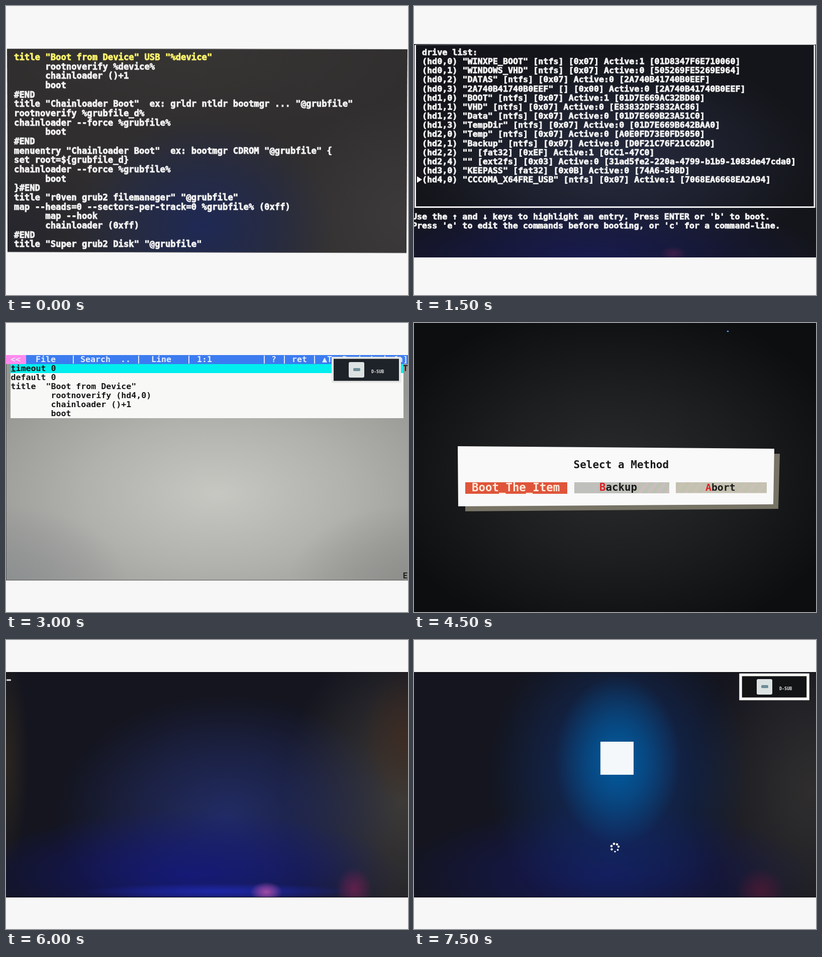
These frames come from a looping animation (800x577 px, 8 s). An HTML page:

```html
<!DOCTYPE html>
<html lang="en">
<head>
<meta charset="utf-8">
<title>Boot sequence</title>
<style>
  html, body { margin: 0; width: 100%; height: 100%; overflow: hidden; background: #f7f7f7; }
  svg { display: block; width: 100%; height: 100%; }
  text { font-family: "DejaVu Sans Mono", monospace; font-weight: bold; white-space: pre; }
</style>
</head>
<body>
<svg id="stage" viewBox="0 0 800 577"></svg>
<script>
const LOOP = 8000, HOLD = 1500;
let nextId = 0;

const rect = (x, y, w, h, fill, extra = '') =>
  `<rect x="${x}" y="${y}" width="${w}" height="${h}" fill="${fill}" ${extra}/>`;

const poly = (points, fill) => `<polygon points="${points}" fill="${fill}"/>`;

const ellipse = (x, y, rx, ry, fill) =>
  `<ellipse cx="${x}" cy="${y}" rx="${rx}" ry="${ry}" fill="${fill}"/>`;

const text = (x, y, size, fill, str, extra = '') =>
  `<text x="${x}" y="${y}" font-size="${size}" fill="${fill}" ${extra}>${str.replace(/</g, '&lt;')}</text>`;

// Over-exposed white or yellow screen text
const brightText = (x, y, size, str, color = '#f2f2f2') =>
  text(x, y, size, color, str, `stroke="${color}" stroke-width=".9"`);

// Label whose first letter is a red shortcut key
const hotkeyText = (x, y, size, str) =>
  `<text x="${x}" y="${y}" font-size="${size}" fill="#1b1b1b"><tspan fill="#df2020">${str[0]}</tspan>${str.slice(1)}</text>`;

// Ellipse that fades from its colour to nothing at the rim
function glow(x, y, rx, ry, color, alpha = 1) {
  const id = 'glow' + nextId++;
  return `<radialGradient id="${id}">
    <stop offset="0" stop-color="${color}" stop-opacity="${alpha}"/>
    <stop offset=".5" stop-color="${color}" stop-opacity="${alpha * 0.55}"/>
    <stop offset="1" stop-color="${color}" stop-opacity="0"/></radialGradient>` +
    ellipse(x, y, rx, ry, `url(#${id})`);
}

// Photographed screen: flat base colour with glows, clipped to its outline
function screen(points, base, ...glows) {
  const id = 'screen' + nextId++;
  return `<clipPath id="${id}"><polygon points="${points}"/></clipPath>
    <g clip-path="url(#${id})">${poly(points, base)}${glows.join('')}</g>`;
}

const WIDE = '0,64 800,64 800,514 0,514';

function menuFile() {
  const lines = `title "Boot from Device" USB "%device"
      rootnoverify %device%
      chainloader ()+1
      boot
#END
title "Chainloader Boot"  ex: grldr ntldr bootmgr ... "@grubfile"
rootnoverify %grubfile_d%
chainloader --force %grubfile%
      boot
#END
menuentry "Chainloader Boot"  ex: bootmgr CDROM "@grubfile" {
set root=\${grubfile_d}
chainloader --force %grubfile%
      boot
}#END
title "r0ven grub2 filemanager" "@grubfile"
map --heads=0 --sectors-per-track=0 %grubfile% (0xff)
      map --hook
      chainloader (0xff)
#END
title "Super grub2 Disk" "@grubfile"`.split('\n');
  return screen('2,85 799,86 797,493 3,491', '#302e2e',
      glow(400, 90, 420, 170, '#3a3836', 0.7),
      glow(800, 420, 260, 240, '#423f40', 0.7),
      glow(0, 480, 260, 200, '#20212c', 0.7),
      glow(390, 440, 260, 220, '#1c2858', 0.9)) +
    '<path d="M2 85.5L799 86.5M3 491L797 493" stroke="#777" fill="none"/>' +
    lines.map((line, i) => brightText(16, 108 + i * 18.66, 17.24, line, i ? undefined : '#fbf26c')).join('');
}

function driveList() {
  const lines = `drive list:
(hd0,0) "WINXPE_BOOT" [ntfs] [0x07] Active:1 [01D8347F6E710060]
(hd0,1) "WINDOWS_VHD" [ntfs] [0x07] Active:0 [505269FE5269E964]
(hd0,2) "DATAS" [ntfs] [0x07] Active:0 [2A740B41740B0EEF]
(hd0,3) "2A740B41740B0EEF" [] [0x00] Active:0 [2A740B41740B0EEF]
(hd1,0) "BOOT" [ntfs] [0x07] Active:1 [01D7E669AC32BD80]
(hd1,1) "VHD" [ntfs] [0x07] Active:0 [E83832DF3832AC86]
(hd1,2) "Data" [ntfs] [0x07] Active:0 [01D7E669B23A51C0]
(hd1,3) "TempDir" [ntfs] [0x07] Active:0 [01D7E669B642BAA0]
(hd2,0) "Temp" [ntfs] [0x07] Active:0 [A0E0FD73E0FD5050]
(hd2,1) "Backup" [ntfs] [0x07] Active:0 [D0F21C76F21C62D0]
(hd2,2) "" [fat32] [0xEF] Active:1 [0CC1-47C0]
(hd2,4) "" [ext2fs] [0x03] Active:0 [31ad5fe2-220a-4799-b1b9-1083de47cda0]
(hd3,0) "KEEPASS" [fat32] [0x0B] Active:0 [74A6-508D]
(hd4,0) "CCCOMA_X64FRE_USB" [ntfs] [0x07] Active:1 [7068EA6668EA2A94]`.split('\n');
  return screen('0,76 800,77 800,502 0,502', '#14151a',
      glow(400, 310, 400, 220, '#2a3048', 0.8),
      glow(340, 500, 480, 120, '#171a58', 0.8),
      glow(516, 494, 26, 14, '#582050', 0.6)) +
    `<path d="M2.5 78V401.5H797V78" fill="none" stroke="#f0f0f2" stroke-width="3"/>
     <path d="M2 77.5H797" stroke="#77777c"/>` +
    lines.map((line, i) => brightText(16, 98 + i * 18.15, 16.72, line)).join('') +
    poly('6,340 16,346.5 6,353', '#fff') +
    brightText(-4, 425.5, 16.68, "Use the ↑ and ↓ keys to highlight an entry. Press ENTER or 'b' to boot.") +
    brightText(-4, 443.5, 16.68, "Press 'e' to edit the commands before booting, or 'c' for a command-line.");
}

const inputBadge = (fill, border, width) =>
  rect(650, 69.5, 134, 48, fill, `stroke="${border}" stroke-width="${width}"`) +
  rect(682, 78, 31, 31, '#dce2e2', 'rx="3"') +
  rect(691, 90, 14, 6, '#6d8e98', 'rx="2"') +
  text(727, 99.5, 8.4, '#e4e4e4', 'D-SUB');

function editor() {
  const menu = [[9, '<<'], [59, 'File'], [148, 'Search  ..'], [289, 'Line'], [380, '1:1'],
    [528, '?'], [569, 'ret'], [629, '▲T  Pn'], [720, 'dn'], [770, 'fn]']];
  const lines = ['timeout 0', 'default 0', 'title  "Boot from Device"',
    '        rootnoverify (hd4,0)', '        chainloader ()+1', '        boot'];
  return screen(WIDE, '#969693',
      glow(420, 340, 520, 290, '#cacac5', 0.95),
      glow(0, 514, 240, 150, '#868b8e', 0.6),
      glow(800, 514, 240, 150, '#858583', 0.6)) +
    rect(0, 64, 800, 18, '#3c7cf0') + rect(0, 64, 40, 18, '#ff8aee') +
    [134, 264, 364, 514, 554, 614, 704, 754].map(x => rect(x - 1, 65, 2, 16, '#dce8ff')).join('') +
    menu.map(([x, label]) => text(x, 77.5, 16.6, '#e4ecff', label)).join('') +
    rect(9, 82, 782, 18, '#00eeee') + rect(9, 100, 782, 90, '#f8f8f6') +
    rect(10, 95, 9, 3, '#087f80') +
    lines.map((line, i) => text(9.5, 95.5 + i * 18, 16.6, '#171717', line)).join('') +
    text(790, 95.5, 16.6, '#222', 'T') + text(789.5, 509.5, 16.6, '#222', 'E') +
    '<path d="M0 513.5H800M.5 82V514" stroke="#555" fill="none"/>' +
    inputBadge('#1e232a', '#e8e8e6', 4);
}

function methodDialog() {
  const stripes = `<pattern id="moire" width="18" height="30" patternUnits="userSpaceOnUse" patternTransform="skewX(-35)">
    ${rect(0, 0, 6, 30, '#d8b8c0')}${rect(9, 0, 6, 30, '#b6c3a0')}</pattern>`;
  return screen('0,0 800,0 800,577 0,577', '#0d0e10',
      glow(400, 300, 480, 340, '#2e2f30', 0.9)) + stripes +
    ellipse(624.5, 16.5, 2, 1.5, '#5c90e0') +
    poly('102,262 728,261 725,371 102,376', '#777365') +
    poly('87,246 717,251 715,362 88,366', '#f9f9f9') +
    rect(102, 318, 203, 23, '#df553a') +
    rect(319, 318, 189, 22, '#bfc0bb') + rect(440, 318, 68, 22, 'url(#moire)', 'opacity=".5"') +
    rect(521, 318, 181, 21.5, '#c4c2b2') + rect(521, 318, 181, 21.5, 'url(#moire)', 'opacity=".3"') +
    text(317.5, 289.5, 21, '#1b1b1b', 'Select a Method') +
    text(115, 335.5, 22.4, '#ffe9d8', 'Boot_The_Item') +
    hotkeyText(369, 335, 20.8, 'Backup') +
    hotkeyText(580, 334.5, 19.8, 'Abort');
}

function blankScreen() {
  return screen(WIDE, '#14151f',
      glow(790, 320, 240, 330, '#44413c', 0.85),
      glow(795, 190, 90, 140, '#4a2a18', 0.5),
      glow(440, 350, 340, 240, '#243070', 0.85),
      glow(360, 470, 430, 130, '#12168c', 0.7),
      glow(420, 502, 270, 16, '#2430d0', 0.6),
      glow(0, 240, 45, 220, '#3a3020', 0.6),
      glow(518, 503, 32, 20, '#b050a8', 0.9),
      glow(693, 497, 36, 42, '#8a2058', 0.6)) +
    '<path d="M0 64.5H800M0 513.5H800" stroke="#08080c"/>' +
    rect(1, 78.5, 9, 3, '#e8e8e8', 'rx="1"');
}

function bootSplash() {
  const dots = [[398, 407, 2.4], [404, 408, 2.3], [407, 412.5, 2.2], [405.5, 419, 1.9],
    [400, 422.5, 1.7], [393.5, 418, 2.3], [393, 411.5, 2.4]];
  return screen(WIDE, '#14151e',
      glow(790, 300, 230, 330, '#363432', 0.8),
      glow(380, 470, 420, 140, '#14186c', 0.7),
      glow(405, 270, 260, 300, '#0f347a', 0.75),
      glow(405, 240, 125, 170, '#0060a4', 0.95),
      glow(690, 500, 50, 45, '#601838', 0.6)) +
    '<path d="M0 64.5H800M0 513.5H800" stroke="#08080c"/>' +
    rect(371, 203, 66, 66, '#f4f8fa') +
    dots.map(([x, y, r]) => ellipse(x, y, r, r, '#f0f0f0')).join('') +
    inputBadge('#121416', '#f8f8f4', 5.5);
}

const stage = document.getElementById('stage');
stage.innerHTML = [menuFile, driveList, editor, methodDialog, blankScreen, bootSplash]
  .map(draw => `<g visibility="hidden">${draw()}</g>`).join('');
const scenes = [...stage.children];

const start = performance.now();
function tick() {
  const time = (performance.now() - start) % LOOP;
  const current = Math.floor(time / HOLD);
  scenes.forEach((scene, i) => scene.setAttribute('visibility', i === current ? 'visible' : 'hidden'));
  requestAnimationFrame(tick);
}
tick();
</script>
</body>
</html>
```
